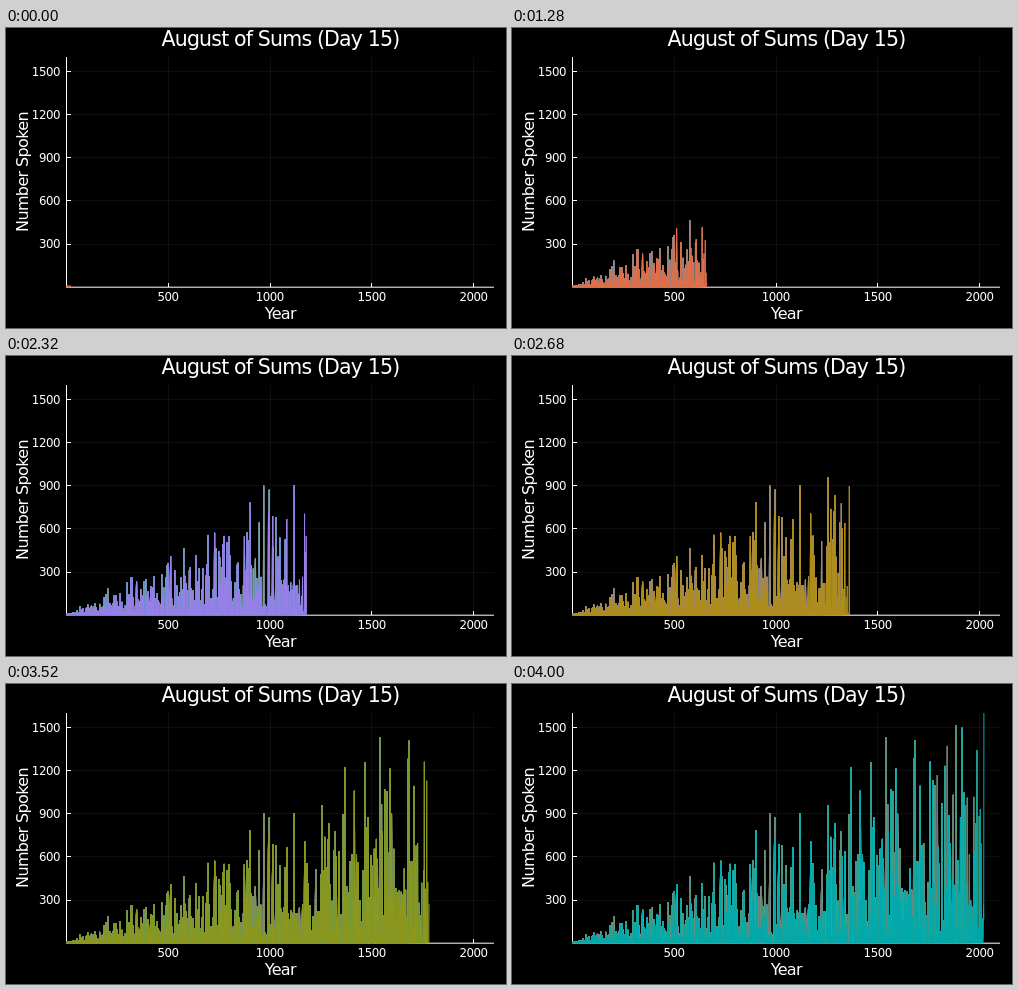
Animation, 500 px wide and 300 px high, one loop 4.04 s. Source, as an HTML page with a canvas:

```html
<!DOCTYPE html>
<html lang="en">
<head>
<meta charset="utf-8">
<title>Number Spoken</title>
<style>
  html, body { margin: 0; width: 100%; height: 100%; overflow: hidden; background: #000; }
  svg, canvas { position: absolute; left: 0; top: 0; }
  text { fill: #fff; font: 16px "DejaVu Sans", sans-serif; letter-spacing: -0.04em; text-anchor: middle; }
  .title { font-size: 20.5px; }
  .tick { font-size: 11.8px; }
  .end { text-anchor: end; }
</style>
</head>
<body>
<svg id="axes" width="500" height="300">
  <text class="title" x="274.5" y="18.3">August of Sums (Day 15)</text>
  <text x="274.3" y="291">Year</text>
  <text transform="translate(21.8 144) rotate(-90)">Number Spoken</text>
</svg>
<canvas id="plot" width="500" height="300"></canvas>
<script>
const FRAME = 40, FRAMES = 101, STEP = 20;
const LEFT = 60.45, RIGHT = 488.2, TOP = 29.2, BASE = 259.2;
const COLORS = ['#009afa', '#e36f47', '#3ea44e', '#c371d2', '#ac8e18', '#00aaae', '#ed5e93', '#c68225',
                '#00a98d', '#8e971e', '#00a9cc', '#9b7fe9', '#618df6', '#f06073', '#dd65b6', '#6c9f33'];
const px = n => LEFT + n * (RIGHT - LEFT) / 2100;
const py = v => BASE - v * (BASE - TOP) / 1600;

// Each number is the age of the previous one, or 0 if that was new.
function speak(start, count) {
  const said = [...start], last = new Map();
  for (let i = 0; i < count - 1; i++) {
    if (i >= start.length - 1) said[i + 1] = last.has(said[i]) ? i - last.get(said[i]) : 0;
    last.set(said[i], i);
  }
  return said;
}

function buildAxes() {
  const svg = document.getElementById('axes');
  const add = (tag, attrs, label = '') => {
    const el = document.createElementNS('http://www.w3.org/2000/svg', tag);
    for (const key in attrs) el.setAttribute(key, attrs[key]);
    el.textContent = label;
    svg.append(el);
  };
  const line = (d, opacity = 1) => add('path', { d, stroke: '#fff', 'stroke-opacity': opacity, fill: 'none' });
  for (let n = 500; n <= 2000; n += 500) {
    const x = Math.floor(px(n)) + 0.5;
    line(`M${x} 29V259`, 0.05);
    line(`M${x} 259v-4`);
    add('text', { class: 'tick', x: px(n) - 0.3, y: 273.2 }, n);
  }
  for (let v = 300; v <= 1500; v += 300) {
    const y = Math.floor(py(v)) + 0.5;
    line(`M60 ${y}H488`, 0.05);
    line(`M60 ${y}h5`);
    add('text', { class: 'tick end', x: 54, y: py(v) + 4.2 }, v);
  }
  line('M60.5 29V259');
  line(`M60 ${BASE}H488`);
}

const ctx = document.getElementById('plot').getContext('2d');
const numbers = speak([0, 13, 1, 8, 6, 15], FRAMES * STEP);
ctx.beginPath();
ctx.rect(60, 29, 428, 231);
ctx.clip();
ctx.lineWidth = 1;
ctx.lineJoin = 'miter';

function drawSeries(k) {
  ctx.strokeStyle = COLORS[(k + 1) % COLORS.length];
  ctx.beginPath();
  for (let i = 0; i < (k + 1) * STEP; i++) ctx.lineTo(px(i + 1), py(numbers[i]));
  ctx.stroke();
}

// Every step lays a longer series over all the earlier ones.
let drawn = -1;
function render(now) {
  const k = Math.floor(now / FRAME) % FRAMES;
  if (k < drawn) {
    ctx.clearRect(0, 0, 500, 300);
    drawn = -1;
  }
  while (drawn < k) drawSeries(++drawn);
}

buildAxes();
const origin = performance.now();
function tick() {
  render(performance.now() - origin);
  requestAnimationFrame(tick);
}
tick();
</script>
</body>
</html>
```
